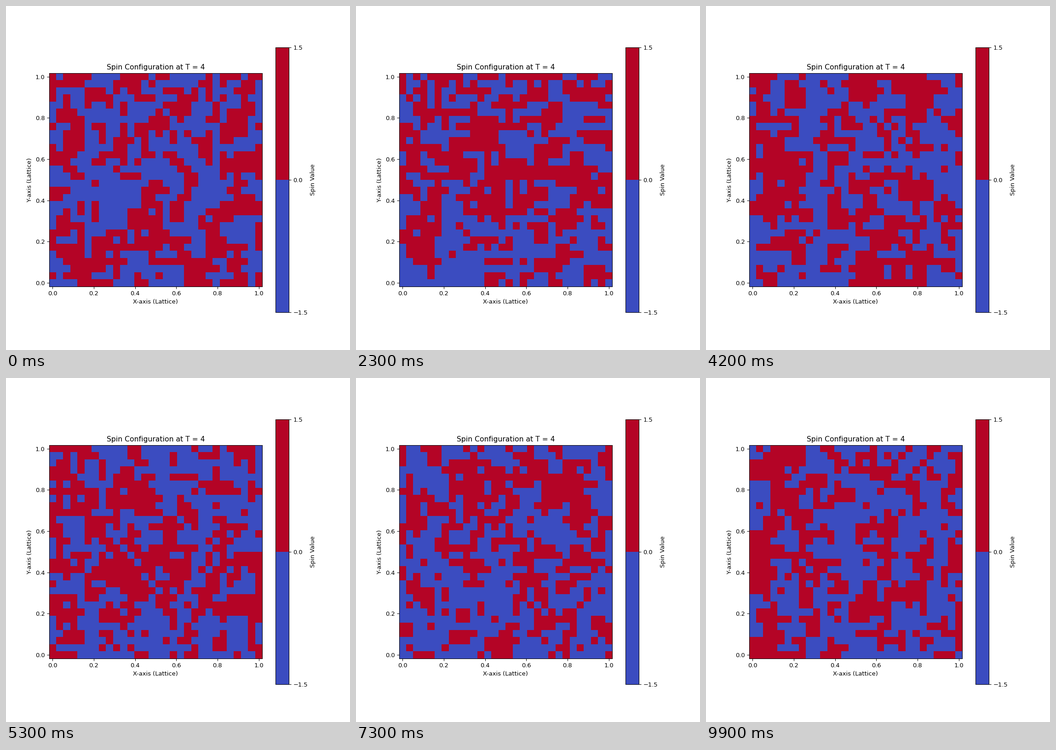
These frames come from a looping animation (748 by 748 pixels, 10 s). A matplotlib script:

```python
import numpy as np
import matplotlib.pyplot as plt
from matplotlib.animation import FuncAnimation

N = 30          # lattice side
T = 4           # temperature, in units of the coupling
FRAMES = 100
INTERVAL = 100  # ms

rng = np.random.default_rng(10)
ACCEPT = {dE: np.exp(-dE / T) for dE in (-8, -4, 0, 4, 8)}


def sweep(spins):
    """One Metropolis sweep with periodic edges, in place."""
    sites = rng.integers(0, N, (N * N, 2)).tolist()
    for (i, j), r in zip(sites, rng.random(N * N)):
        around = (spins[i - 1][j] + spins[(i + 1) % N][j]
                  + spins[i][j - 1] + spins[i][(j + 1) % N])
        if r < ACCEPT[2 * spins[i][j] * around]:
            spins[i][j] = -spins[i][j]


def simulate():
    spins = rng.choice([-1, 1], (N, N)).tolist()
    states = []
    for _ in range(FRAMES):
        sweep(spins)
        states.append(np.array(spins))
    return states


states = simulate()

fig, ax = plt.subplots(figsize=(8, 8), dpi=93.5)
grid = np.linspace(0, 1, N)
mesh = ax.pcolormesh(grid, grid, states[0], shading="nearest",
                     cmap=plt.get_cmap("coolwarm", 2), vmin=-1.5, vmax=1.5)
ax.set_aspect("equal")
ax.set_title(f"Spin Configuration at T = {T}")
ax.set_xlabel("X-axis (Lattice)")
ax.set_ylabel("Y-axis (Lattice)")
fig.colorbar(mesh, ax=ax, ticks=[-1.5, 0, 1.5], label="Spin Value")


def update(frame):
    mesh.set_array(states[frame])
    return (mesh,)


anim = FuncAnimation(fig, update, frames=FRAMES, interval=INTERVAL,
                     repeat=True, repeat_delay=0, blit=False)
plt.show()
```
